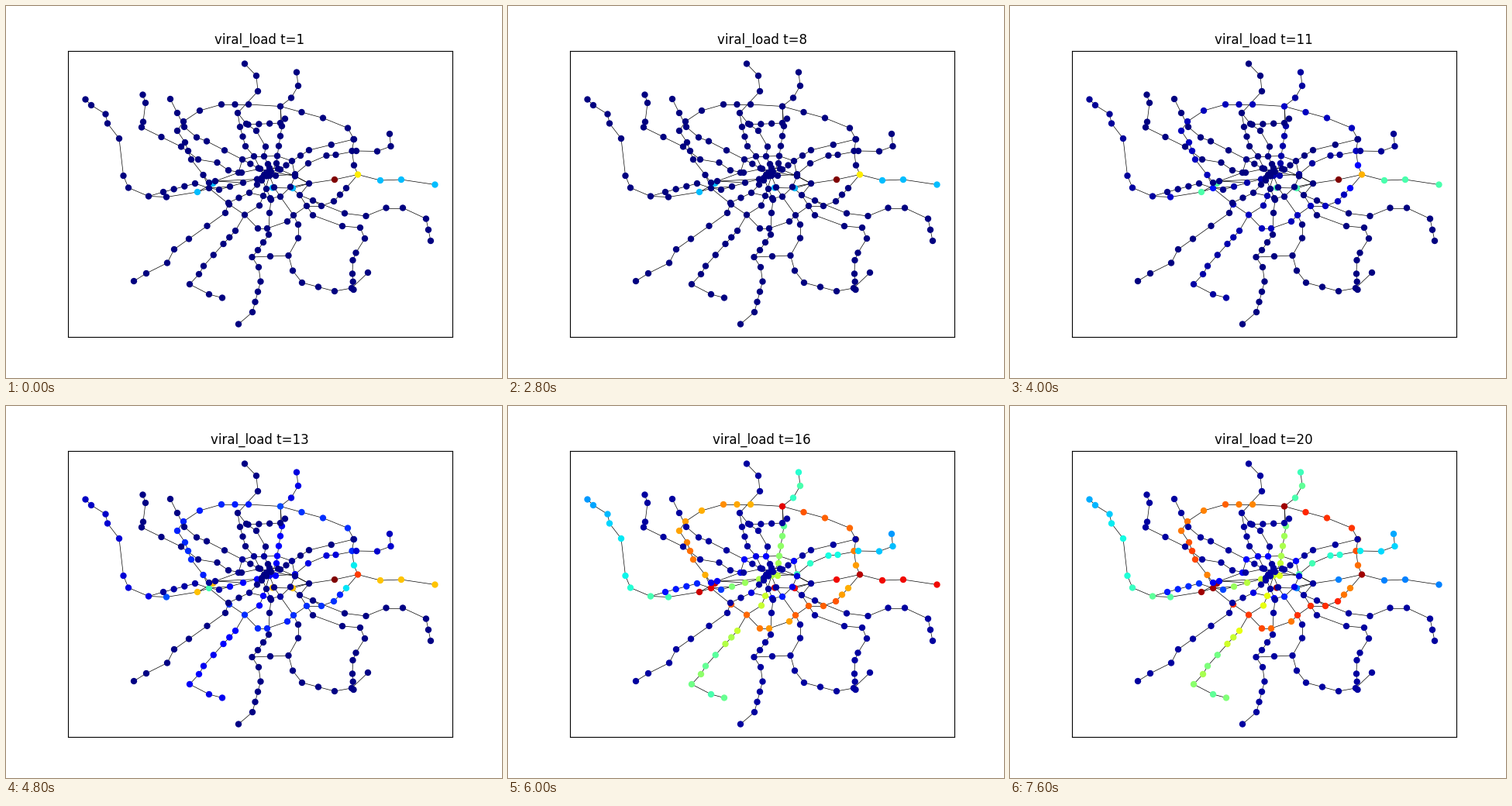
Animation of 640 by 480 pixels, one loop 8 s. Source, as a matplotlib script:

```python
import random
import numpy as np
import matplotlib.pyplot as plt
from matplotlib.animation import FuncAnimation
from matplotlib.collections import LineCollection

random.seed(4)

EAST_HUB, NORTH_HUB, WEST_HUB = (454, 217.5), (354, 129.5), (247, 240)
WEST_GATE, GATE, CORE = (262, 235), (267, 229), (344, 234.5)
SOURCE, SOUTH, CENTRE = (424, 224), (308, 269.5), (348, 219)
FAR_EAST = [(553.5, 230.5), (510, 224), (483, 225)]
UNDER_CORE = (370, 235)

HUBS = {EAST_HUB, NORTH_HUB, WEST_HUB, WEST_GATE, GATE, CORE}
ISOLATED = {*FAR_EAST, SOURCE, UNDER_CORE}
start = dict.fromkeys([*FAR_EAST, UNDER_CORE, CORE, WEST_HUB, GATE], .31)
start.update({SOURCE: 1, EAST_HUB: .66})

QUIET = .03
heat = {}
edges = []


def expand(route):
    """Turn key points into stations; an integer n puts n even stops in a gap."""
    stops, gap = [], 0
    for item in route:
        if isinstance(item, int):
            gap = item
            continue
        if gap:
            (x0, y0), (x1, y1) = stops[-1], item
            stops += [(x0 + (x1 - x0) * k / (gap + 1), y0 + (y1 - y0) * k / (gap + 1))
                      for k in range(1, gap + 1)]
            gap = 0
        stops.append(item)
    return stops


def line(*route, first=QUIET, last=None, spread=0):
    """Add a line whose final heat runs from first to last, with some scatter."""
    stops = expand(route)
    levels = np.linspace(first, first if last is None else last, len(stops))
    for stop, level in zip(stops, levels):
        level += random.uniform(-spread, spread)
        heat.setdefault(stop, .97 if stop in HUBS else level)
    edges.extend(zip(stops, stops[1:]))


# Outer ring
line((229, 149), (250, 135), (278, 127), 1, (313, 127), NORTH_HUB, 1, (409, 144.5),
     (441, 157.5), (449, 172), (446.5, 187), (449, 205.5), EAST_HUB, (439, 235), 1,
     (423, 252), (407, 258), (388, 258), (371, 270), (363, 278), (337, 287),
     (325, 287), SOUTH, (288, 256), WEST_GATE, (254.5, 218), (239, 198), 1,
     (231, 176), (221, 161), (229, 149), first=.82, spread=.06)

# Busy lines
line(*FAR_EAST, EAST_HUB, SOURCE, (391, 229), UNDER_CORE, CORE)
heat[391, 229] = QUIET
line((102.5, 120.5), (110, 128), (128.5, 139.5), (131, 151.5), (146, 171),
     (151.5, 219), (158, 234.5), (184, 245.5), (207, 246.5), WEST_HUB, WEST_GATE,
     (289, 233), (306, 228), (324, 223.5), CENTRE, first=.28, last=.62, spread=.02)
line(CENTRE, (373, 217), (390, 203), (413.5, 193), (425.5, 192), (452, 187),
     (479, 187.5), (496.5, 181), (495, 165), first=.48, last=.3, spread=.02)
line((375, 85.5), (377, 103), (368, 118.5), NORTH_HUB, (356, 155), 2, (350, 193.5),
     (349, 203), (340, 219), (332, 245), (327, 257.5), SOUTH,
     first=.42, last=.68, spread=.03)
line(SOUTH, (296, 290), 1, (280.5, 307), 1, (255, 335.5), (249, 346), (237, 359),
     (262, 372), (279, 376.5), first=.6, last=.46, spread=.05)
line(WEST_HUB, GATE)

# Inner ring and short western branches
line((270, 226), (300, 215), (305, 198), (320, 194), (333, 194), (350, 193.5),
     (369, 200), (373, 219.5), (391, 229), (367, 233.5), (354, 246), (341, 248),
     (332, 245), (314, 241), first=.13, spread=.05)
line((184, 245.5), (203, 240), 2, (244, 229), WEST_GATE, (275, 237), (289, 233),
     first=.14, last=.2)
line((262, 228), (270, 226), (306, 228), first=.1)
line((270, 226), (324, 223.5))

# Quiet lines
line((308, 74.5), (323, 90), (325, 110), (299, 138), (302, 156), 1, (309, 181),
     (320, 194), (328, 210), (333, 218), (330, 222), 1, (342, 250), (340, 267),
     (339, 295), 1, (325, 315), (317.5, 324), (326, 337), (328.5, 355.5), 2,
     (318, 395), (300, 410.5))
line((212, 120), 1, (230, 156), (246, 169.5), (259, 174.5), 1, (305, 198), 2,
     (336, 215), (340, 219), (346, 234), (354, 246), (371, 270), (377, 282),
     (377, 299.5), (364.5, 322), (370, 341.5), (382, 357), 1, (424, 368),
     (446, 364), (467, 344))
line((176.5, 114.5), (180, 125), (177, 149.5), (175, 156.5), 1, (226, 181.5),
     (248, 198), (272.5, 202), (287, 212), (304, 215), (328, 210), (342, 214),
     (373, 219.5), (391, 229), (379, 244), (396, 251), (437, 267.5), (464.5, 271),
     (490.5, 260.5), (512, 260.5), (542, 274.5), 1, (548, 303))
line((448.5, 172), 1, (391, 186), 1, (369, 200), 1, (354, 211), (342, 214), 2,
     (324, 230.5), (314, 241), 1, (287, 254), (283, 267), 1, (236, 300.5),
     (217, 314), (208, 331.5), (181, 345), (165, 355))
line((299, 138), (310, 152), (323, 161), (335, 181.5), (333, 194), (338, 204),
     (340, 209), (351, 210), (373, 219.5), (367, 233.5), (379, 244), (388, 258),
     (396, 270), (434, 284), (457, 286), (463, 300), (451.5, 318.5), (447.5, 328),
     (447, 345.5), 1, (448.5, 366))
line((360, 145.5), (354, 151), 2, (312.5, 153), (310, 152))
line((317.5, 324), 1, (364.5, 322))

# Transfers
line((230, 156), (229, 149))
line((226, 181.5), (231, 176))
line((262, 228), (254.5, 218))
line(NORTH_HUB, (354, 151), (356, 155))
line((396, 251), (407, 258))
line((448.5, 172), (449, 172))
line((446.5, 187), (452, 187))

# Stops next to a source catch the wave early
early = {b for edge in edges for a, b in (edge, edge[::-1])
         if a in start and a not in ISOLATED}


def load(stop, day):
    base = start.get(stop, 0)
    if stop in ISOLATED:
        return np.interp(day, [10, 13, 16, 18], [base, max(base, .7), .9, .25])
    if stop in start:
        onset = .6
    else:
        onset = .45 if stop in early else .2
    growth = np.interp(day, [10, 13, 16, 18], [0, onset, .94, 1])
    return base + (heat[stop] - base) * growth


fig = plt.figure(figsize=(6.4, 4.8), dpi=100)
ax = fig.add_subplot()
ax.set(xlim=(80, 576), ylim=(427.2, 57.6), xticks=[], yticks=[])
ax.add_collection(LineCollection(edges, colors="black", linewidths=.5, zorder=1))
# Busy stops lie beneath the quiet ones
order = sorted(heat, key=lambda s: heat[s] < .22 and s not in start)
xs, ys = zip(*order)
dots = ax.scatter(xs, ys, s=25, c=np.zeros(len(order)), cmap="jet",
                  vmin=0, vmax=1, linewidths=1, zorder=2)
title = ax.set_title("", x=.499, pad=6.7)


def update(frame):
    day = frame + 1
    dots.set_array(np.array([load(stop, day) for stop in order]))
    title.set_text(f"viral_load t={day}")
    return dots, title


anim = FuncAnimation(fig, update, frames=20, interval=400, repeat=True, repeat_delay=0)
plt.show()
```
